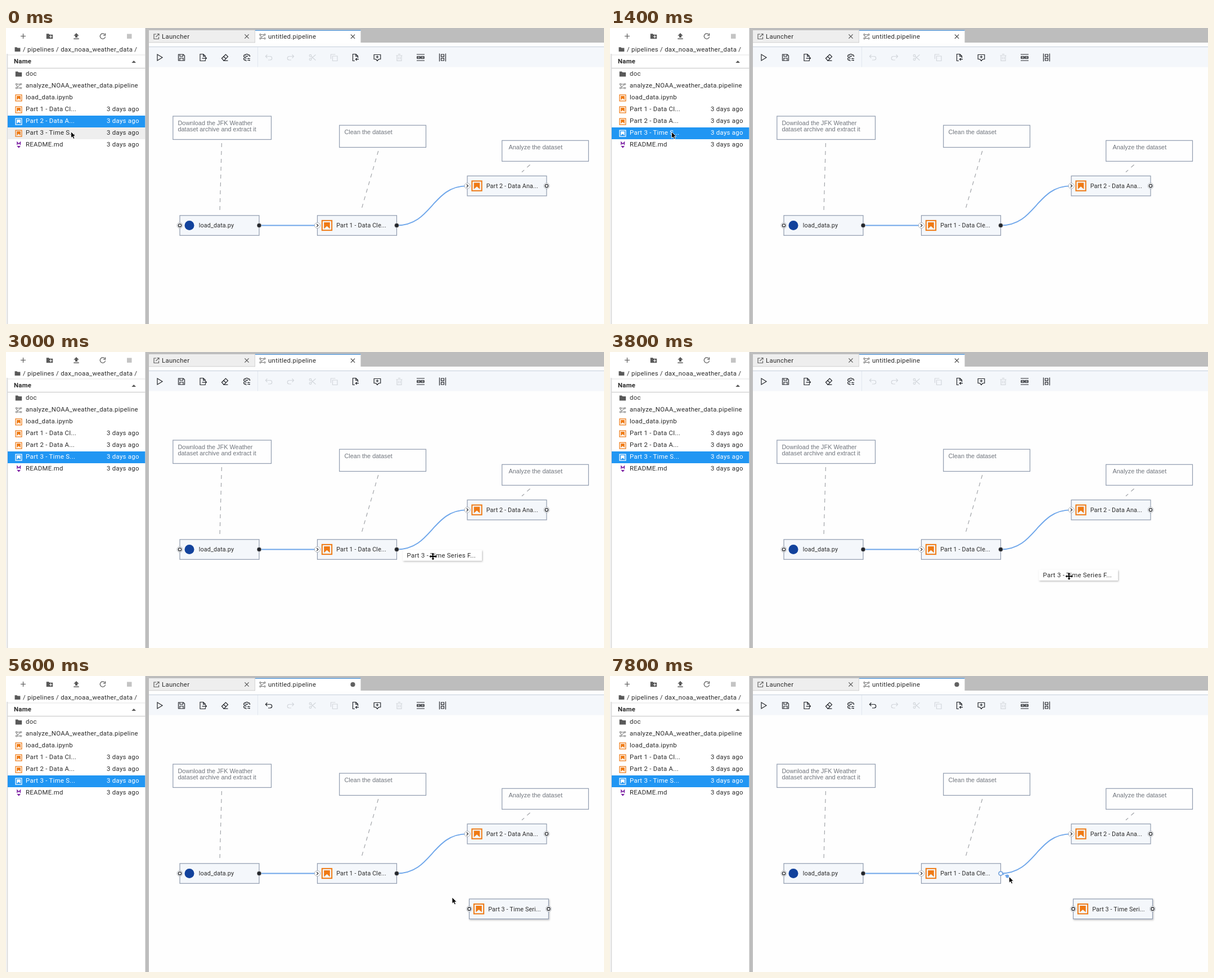
Write an HTML page that moves like this. It is 1063 px wide and 527 px high and loops after 8 s.

```html
<!DOCTYPE html>
<html lang="en">
<head>
<meta charset="utf-8">
<title>Pipeline editor</title>
<style>
html, body { margin: 0; width: 100%; height: 100%; overflow: hidden; background: #fefefe; }
svg { display: block; width: 1063px; height: 527px; }
text { font: 11.4px Roboto, "Noto Sans", sans-serif; letter-spacing: .28px; fill: #2b2b2b; white-space: pre; }
.node text { font-size: 10.8px; letter-spacing: .13px; }
.note text { font: 10.9px "Liberation Sans", Arial, sans-serif; letter-spacing: 0; fill: #70757d; }
.line { fill: none; stroke: currentColor; stroke-width: 1.2; }
</style>
</head>
<body>
<svg id="stage" viewBox="0 0 1063 527" xmlns="http://www.w3.org/2000/svg"></svg>
<script>
const STEP = 200, LOOP = 8000;
const ORANGE = '#ef7a14', BLUE = '#6ea6ea', INK = '#24272c', DIM = '#d3d7dc', EDGE = '#8f9bae';

const rect = (x, y, w, h, fill, extra = '') =>
  `<rect x="${x}" y="${y}" width="${w}" height="${h}" fill="${fill}" ${extra}/>`;
const label = (x, y, s, extra = '') => `<text x="${x}" y="${y}" ${extra}>${s}</text>`;
const icon = (x, y, d, color = INK, extra = '') =>
  `<g transform="translate(${x} ${y})" color="${color}" ${extra}><path class="line" d="${d}"/></g>`;
const circle = (x, y, r, fill, extra = '') => `<circle cx="${x}" cy="${y}" r="${r}" fill="${fill}" ${extra}/>`;

// Notebook symbol: framed bookmark
function notebook(x, y, size, color) {
  const k = size / 18;
  return `<g transform="translate(${x} ${y}) scale(${k})">
    <rect x="-8.2" y="-8.2" width="16.4" height="16.4" fill="none" stroke="${color}" stroke-width="1.9"/>
    <path d="M-5-5.3H5V5.6L0 1.2L-5 5.6Z" fill="${color}"/></g>`;
}

// Pipeline symbol: small rings joined by lines
function flow(x, y) {
  const ring = (cx, cy) => circle(cx, cy, 1.3, 'none');
  return `<g transform="translate(${x} ${y})" fill="none" stroke="#616161" stroke-width=".9">
    <path d="M-2.7-3.4H2.7M-2.7 3.4H2.7M3-2.5L-3 2.5M-4.6-1.2L-1.2 .6"/>
    ${ring(-4, -3.4)}${ring(4, -3.4)}${ring(-4, 3.4)}${ring(4, 3.4)}</g>`;
}
const folder = (x, y, k) =>
  `<path transform="translate(${x} ${y}) scale(${k})" d="M-6-4.5H-1.5L0-3H6V5H-6Z" fill="#595959"/>`;

// File browser
const files = [
  ['doc', 'dir'], ['analyze_NOAA_weather_data.pipeline', 'flow'], ['load_data.ipynb', 'nb'],
  ['Part 1 - Data Cl...', 'nb', 1], ['Part 2 - Data A...', 'nb', 1],
  ['Part 3 - Time S...', 'nb', 1], ['README.md', 'md', 1]
];
const rowY = i => 81 + 21.05 * i;

function fileRow([name, kind, dated], i, state) {
  const y = rowY(i), on = state === 'on';
  const fill = on ? 'style="fill:#fff"' : '';
  let s = state ? rect(3, Math.round(y - 9.2), 244.5, 21, on ? '#2196f3' : '#eeeeee') : '';
  if (kind === 'dir') s += folder(22.5, y + .8, .95);
  if (kind === 'flow') s += flow(22.5, y + 1.4);
  if (kind === 'nb') s += notebook(22.5, y + 1.4, 12, on ? '#fff' : ORANGE);
  if (kind === 'md') s += `<path d="M19.9 ${y + 1}V${y - 4}L22.7 ${y - .8}L25.5 ${y - 4}V${y + 1}" fill="none" stroke="#7b1fa2" stroke-width="1.4"/>
    <path d="M19.4 ${y + 2.8}H26L22.7 ${y + 6.4}Z" fill="#7b1fa2"/>`;
  s += label(35, y + 3.8, name, fill);
  if (dated) s += label(236.8, y + 3.8, '3 days ago', 'text-anchor="end" ' + fill);
  return s;
}

function sidebar() {
  return rect(0, 0, 247.5, 527, '#fff') + rect(0, 46, 3, 481, '#f1f1f1') + rect(2.3, 46, .9, 481, '#c9c9c9') +
    icon(30.5, 14.5, 'M-4.5 0H4.5M0-4.5V4.5', '#555') +
    folder(77.5, 14.5, .95) + icon(79, 15.5, 'M-2 0H3M.5-2.5V2.5', '#fff') +
    `<path d="M125 9L129.7 13.8H127V17H123V13.8H120.3ZM120.3 18.5H129.7V20H120.3Z" fill="#595959"/>` +
    icon(172, 14.5, 'M3.5-3A4.7 4.7 0 1 0 4.6 1M4.6-5V-1.4H1', '#595959') +
    rect(215, 10.5, 8.5, 8.5, '#c4c4c4') +
    folder(20.5, 38, .82) + label(30, 41.5, '/ pipelines / dax_noaa_weather_data /') +
    rect(3, 47.5, 244.5, 1, '#e3e3e3') + rect(3, 71, 244.5, 1, '#c4c4c4') +
    label(14, 63, 'Name', 'style="font-weight:600"') +
    `<path d="M223.4 62L227.2 58L231 62Z" fill="#555"/><g id="rows"></g>`;
}

function tabs() {
  const cross = 'M-3.6-3.6L3.6 3.6M3.6-3.6L-3.6 3.6';
  return rect(247.5, 0, 6.5, 527, '#bdbdbd') + rect(254, 0, 809, 26, '#bdbdbd') +
    rect(254, 4, 188.5, 22, '#eeeeee') + rect(443, 4, 187.5, 22.5, '#fff') + rect(443, 3.6, 187.5, 1.4, '#5b9fe0') +
    rect(254, 25.5, 189, .8, '#c8c8c8') + rect(254, 33, 809, 1.1, '#c5cedb') +
    icon(267.5, 15, 'M-.5-4H-4.5V4.5H4V.8M1.2-4.5H4.5V-1.2M4.3-4.3L-1.2 1.2', '#616161') +
    label(277, 18.6, 'Launcher') + icon(428, 15, cross, '#555') +
    flow(456, 15.2) + label(466, 18.6, 'untitled.pipeline') +
    icon(616.5, 15.2, cross, '#444', 'id="close"') + circle(616.5, 15.2, 4.1, '#616161', 'id="dirty"');
}

function toolbar() {
  const tools = [
    [273, 'M-4-5.5V5.5L5 0Z'],
    [312, 'M-5.5-5.5H3.2L5.5-3.2V5.5H-5.5ZM-3-5.5V-2H2.5V-5.5M-3 5.5V1H3V5.5'],
    [350, 'M4.3-1.5V-2.5L.8-6H-5V6H4.3V4M.6-6V-2.2H4.3M-1.5 1.3H6.5M4.2-1L6.5 1.3L4.2 3.6'],
    [389, 'M-5.5 1.5L1.5-5.5L5.5-1.5L-.8 5H-2.5ZM-2.2-1.8L2 2.2M-3 5.7H5.5'],
    [428, 'M5-1.2L5.6-2.6L4.2-4.8L2.4-4.2L1.4-6H-1.4L-2.2-4.2L-4.2-4.8L-5.6-2.4L-4.2-.9V.9L-5.6 2.4L-4.2 4.8L-2.2 4.2L-1.4 6H-.5M2-1.6A2.4 2.4 0 1 0-.8 2.2M1.2 2H6M1.2 5H6M2.6 1V3M4.6 4V6'],
    [467, 'M-5.5-2H2.5A3.2 3.2 0 0 1 2.5 4.5H-1M-2.6-5L-5.6-2L-2.6 1', 'undo'],
    [506, 'M5.5-2H-2.5A3.2 3.2 0 0 0-2.5 4.5H1M2.6-5L5.6-2L2.6 1', 'dim'],
    [545, 'M5.5-5L-2.2 1.8M5.5 5L-2.2-1.8M-2.2-3.3A1.8 1.8 0 1 0-5.8-3.3A1.8 1.8 0 1 0-2.2-3.3M-2.2 3.3A1.8 1.8 0 1 0-5.8 3.3A1.8 1.8 0 1 0-2.2 3.3', 'dim'],
    [583, 'M-2.5-2.5H6V6H-2.5ZM-5.5 2.5V-5.5H2.5', 'dim'],
    [621, 'M4.5 1V-2.5L1-6H-4.5V6H-1M.8-6V-2.2H4.5M6 3.2H.5M2.7 1L.5 3.2L2.7 5.4'],
    [660, 'M-2.5 3H-5.8V-5H5.8V3H2.5L0 6ZM-2.5-1H2.5M0-3.5V1.5'],
    [699, 'M-5.5-3.5H5.5M-4-3.5V5.8H4V-3.5M-1.5-1V3.2M1.5-1V3.2M-2-5.8H2', 'dim'],
    [737, 'M-7-5.5H7M-7 5.5H7M-6-2H-1V2H-6ZM1-2H6V2H1ZM-7 0H7'],
    [776, 'M-5.5-7V7M5.5-7V7M-2.5-5.5H2.5V-1.3H-2.5ZM-2.5 1.3H2.5V5.5H-2.5Z']
  ];
  return rect(254, 34, 809, 35.5, '#f4f7fb') + rect(447, 34, 1, 35.5, '#e3e8ef') +
    tools.map(([x, d, k]) => icon(x, 52.5, d, k ? DIM : INK, k === 'undo' ? 'id="undo"' : '')).join('');
}

function note(x, y, w, h, lines, tx) {
  return `<g class="note">${rect(x, y, w, h, '#fefefe', `stroke="${EDGE}" stroke-width="1.2"`)}${
    lines.map((s, i) => label(tx, y + 16 + 10.7 * i, s)).join('')}</g>`;
}

const openPort = (x, y) => circle(x, y, 5, '#fff', 'stroke="#a3a8af" stroke-width=".8"') +
  circle(x, y, 2.7, '#fff', `stroke="${INK}" stroke-width="1.3"`);
const inPort = (x, y) => circle(x, y, 5, '#fff', 'stroke="#9aa0a8" stroke-width=".8"') +
  icon(x, y, 'M-1.3-2.6L1.4 0L-1.3 2.6');
const outPort = (x, y) => circle(x, y, 4, INK, 'stroke="#fff" stroke-width=".6"');

function node(n, hover) {
  const { x, y, name, left, right, raised } = n;
  const cy = y + 17.7;
  const grow = hover && raised ? 2 : 0;
  let s = rect(x, y, 141 + grow, 35.5, hover ? '#dde1e6' : '#f4f7fb',
    (hover ? '' : `stroke="${EDGE}" stroke-width="1.2" `) + (raised ? 'filter="url(#soft)"' : ''));
  s += n.dot ? circle(x + 17, cy, 8.5, '#12429c') : notebook(x + 17, cy, 19, ORANGE);
  s += label(x + 33.7, cy + 3.9, name);
  if (hover) s += [-4.5, 0, 4.5].map(d => circle(x + 132, cy + d, 1.15, '#2f6fe0')).join('');
  return `<g class="node">${s}${left(x, cy)}${right(x + 141, cy)}</g>`;
}

const nodes = {
  load: { x: 309, y: 333.8, name: 'load_data.py', dot: true, left: openPort, right: outPort },
  clean: { x: 553.5, y: 333.8, name: 'Part 1 - Data Cle...', left: inPort, right: outPort },
  analyze: { x: 820, y: 263.4, name: 'Part 2 - Data Ana...', left: inPort, right: openPort },
  series: { x: 823.5, y: 397, name: 'Part 3 - Time Seri...', left: openPort, right: openPort, raised: true }
};

function board() {
  const dash = d => `<path d="${d}" fill="none" stroke="#9a9da2" stroke-width="1.1" stroke-dasharray="7 7"/>`;
  const link = d => `<path d="${d}" fill="none" stroke="${BLUE}" stroke-width="1.9"/>`;
  return rect(254, 69.5, 809, 457.5, '#fefefe') +
    dash('M383.4 205L380 327') + dash('M661.8 219L631.5 324') + dash('M931.5 243.5L917 256.5') +
    link('M450 351.5H550') + link('M694.5 351.5C757.3 351.5 757.3 281.1 820 281.1') +
    note(296.8, 157, 174.7, 41.5, ['Download the JFK Weather', 'dataset archive and extract it'], 305.5) +
    note(592.7, 173.2, 153.8, 39.3, ['Clean the dataset'], 601.5) +
    note(881.7, 200.3, 153.8, 37, ['Analyze the dataset'], 893.5) +
    node(nodes.load) + '<g id="clean"></g>' + node(nodes.analyze) + '<g id="series"></g>';
}

const cursors = {
  arrow: '<path d="M0 0V11.3L2.6 9L4.4 13L6.5 12L4.7 8.2H8.2Z" fill="#000" stroke="#fff" stroke-width=".9"/>',
  move: `<path d="M0-6.5L2.4-3.6H.9V-.9H3.6V-2.4L6.5 0L3.6 2.4V.9H.9V3.6H2.4L0 6.5L-2.4 3.6H-.9V.9H-3.6V2.4L-6.5 0L-3.6-2.4V-.9H-.9V-3.6H-2.4Z"
    fill="#000" stroke="#fff" stroke-width="1" paint-order="stroke"/>`,
  hand: `<g transform="translate(-.3 .6)"><path d="M-2.7-4.7Q-1.4-6.6-.3-4.6L.8-1.5Q2-2.5 3-1.2Q4.2-1.8 5-.6Q6.2-.8 6.5.8Q7.1 3.4 5.8 6.6L.2 7.4Q-1 4.6-3.4 2.4Q-4 .8-2.2 1.2L-1 2Z"
    fill="#fff" stroke="#111" stroke-width="1.1" stroke-linejoin="round"/><path d="M2 2.5L2.5 5M4 2.2L4.4 4.7" stroke="#111" stroke-width=".8"/></g>`
};

const stage = document.getElementById('stage');
stage.innerHTML = `<defs><filter id="soft" x="-10%" y="-30%" width="120%" height="170%">
  <feDropShadow dx="1" dy="1.5" stdDeviation="1.6" flood-color="#000" flood-opacity=".28"/></filter></defs>` +
  board() + sidebar() + tabs() + toolbar() +
  `<g id="ghost">${rect(0, 0, 140.5, 19, '#fff', 'filter="url(#soft)"')}${
    label(7, 13.2, 'Part 3 - Time Series F...')}</g>
  <g id="wire"><path fill="none" stroke="${BLUE}" stroke-width="1.6" stroke-dasharray="4 2"/>${
    circle(0, 0, 3, BLUE)}${circle(694.5, 351.5, 3.3, '#fff', `stroke="${BLUE}" stroke-width="1.4"`)}</g>
  <g id="cursor"></g>`;

const $ = id => document.getElementById(id);
const show = (id, on) => { $(id).style.display = on ? '' : 'none'; };

// Pointer route: time, x, y
const route = [
  [0, 115.5, 184.5], [400, 113, 184], [1000, 109.5, 184.8], [1800, 109.5, 185],
  [2000, 170, 205], [2400, 454.5, 292.5], [2800, 728, 345], [3200, 790, 383],
  [3800, 816, 399.3], [4200, 817, 400], [4800, 824, 403], [5200, 824, 403],
  [5600, 793, 394], [6000, 718, 366], [6400, 694, 356.5], [7400, 694, 356.5],
  [7600, 700, 356], [7800, 709.3, 357], [8000, 709.3, 357]
];
function pointer(t) {
  const i = route.findIndex((p, k) => k && t <= p[0]);
  const [t0, x0, y0] = route[i - 1], [t1, x1, y1] = route[i];
  const u = (t - t0) / (t1 - t0);
  return [x0 + (x1 - x0) * u, y0 + (y1 - y0) * u];
}

function draw(t) {
  const [x, y] = pointer(t);
  const dragging = t >= 1800 && t < 4200, dropped = t >= 4200, wiring = t >= 7600;
  const picked = t < 800 ? 4 : 5;
  $('rows').innerHTML = files.map((f, i) =>
    fileRow(f, i, i === picked ? 'on' : i === 5 ? 'hover' : '')).join('');

  show('ghost', dragging);
  $('ghost').setAttribute('transform', `translate(${x - 53.5} ${y - 11.5})`);

  show('close', !dropped);
  show('dirty', dropped);
  $('undo').setAttribute('color', dropped ? INK : DIM);

  const overSeries = dropped && t < 5400, overClean = t >= 6200 && !wiring;
  $('series').innerHTML = dropped ? node(nodes.series, overSeries) : '';
  $('clean').innerHTML = node(nodes.clean, overClean);

  show('wire', wiring);
  const wx = x - 3, wy = y - .6;
  $('wire').children[0].setAttribute('d', `M697 352L${wx} ${wy}`);
  $('wire').children[1].setAttribute('transform', `translate(${wx} ${wy})`);

  const kind = dragging ? 'move' : overSeries || overClean ? 'hand' : 'arrow';
  $('cursor').innerHTML = cursors[kind];
  $('cursor').setAttribute('transform', `translate(${x} ${y})`);
}

const start = performance.now();
let last = -1;
function tick() {
  const t = Math.floor(((performance.now() - start) % LOOP) / STEP) * STEP;
  if (t !== last) draw(last = t);
  requestAnimationFrame(tick);
}
draw(0);
tick();
</script>
</body>
</html>
```
